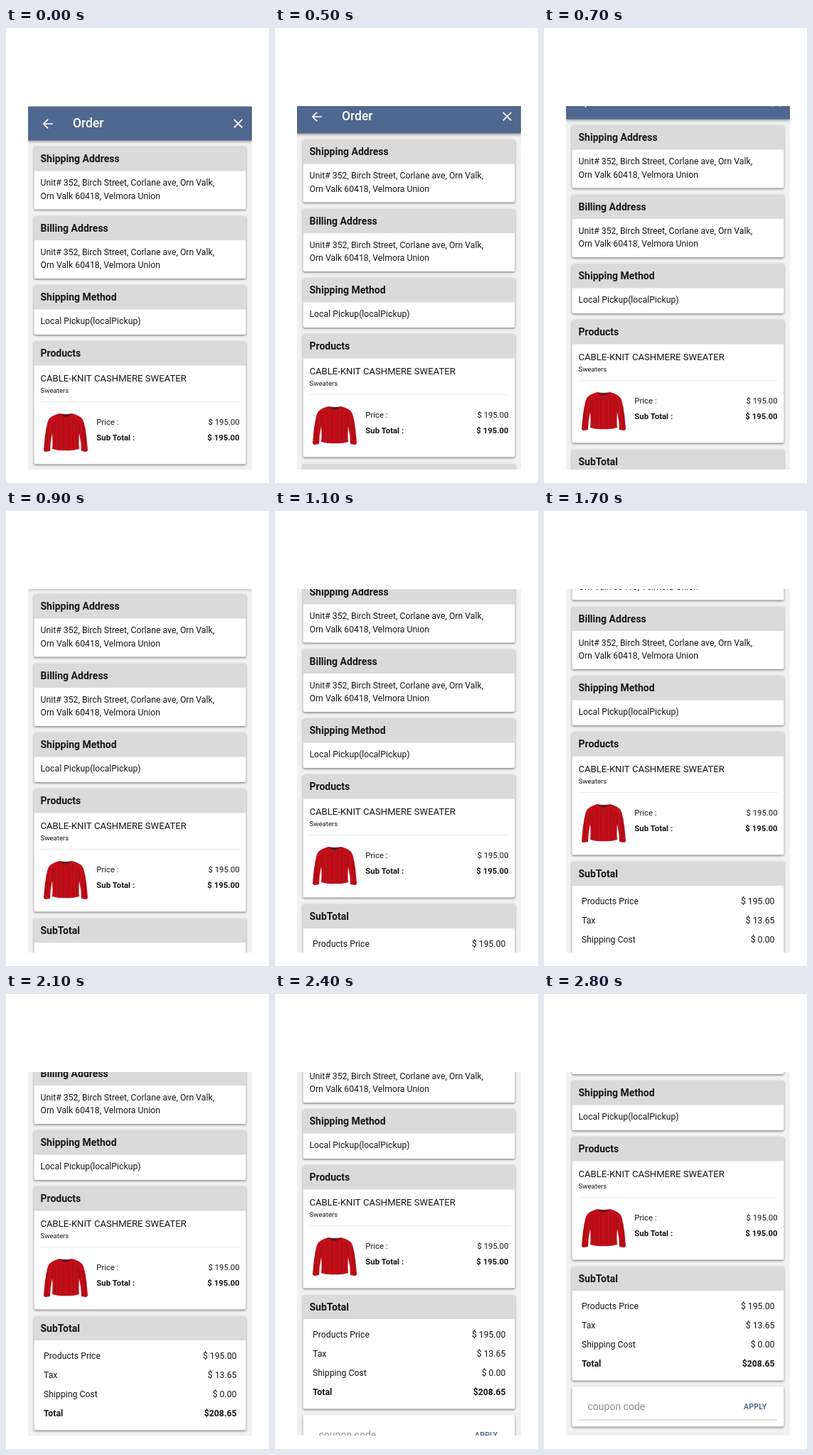
Write an HTML page with a canvas that moves like this. It is 370 px wide and 641 px high and loops after 2900 ms.

```html
<!DOCTYPE html>
<html lang="en">
<head>
<meta charset="utf-8">
<title>Order summary</title>
<style>
  html, body { margin: 0; width: 100%; height: 100%; overflow: hidden; background: #fff; }
  canvas { display: block; }
</style>
</head>
<body>
<canvas id="stage" width="370" height="641"></canvas>
<script>
const ctx = document.getElementById('stage').getContext('2d');
const LOOP = 2900, STEP = 100, HOLD_STEPS = 4, STEP_PX = 10;
const INK = '#161616', BLUE = '#50688f';
const ADDRESS = ['Unit# 352, Birch Street, Corlane ave, Orn Valk,', 'Orn Valk 60418, Velmora Union'];

function text(str, x, y, size, { weight = 400, color = INK, align = 'left', spacing = 0 } = {}) {
  ctx.font = `${weight} ${size}px Roboto, sans-serif`;
  ctx.letterSpacing = spacing + 'px';
  ctx.fillStyle = color;
  ctx.textAlign = align;
  ctx.fillText(str, x, y);
}

function rect(x, y, w, h, color) {
  ctx.fillStyle = color;
  ctx.fillRect(x, y, w, h);
}

function withShadow(alpha, blur, dy, draw) {
  ctx.save();
  ctx.shadowColor = `rgba(0,0,0,${alpha})`;
  ctx.shadowBlur = blur;
  ctx.shadowOffsetY = dy;
  draw();
  ctx.restore();
}

function stroke(d, color, width) {
  ctx.strokeStyle = color;
  ctx.lineWidth = width;
  ctx.stroke(new Path2D(d));
}

function card(top, height, title) {
  const box = new Path2D();
  box.roundRect(39.5, top, 298, height, 2);
  ctx.fillStyle = '#fff';
  withShadow(0.5, 3, 1.3, () => ctx.fill(box));
  if (!title) return;
  ctx.save();
  ctx.clip(box);
  rect(39, top, 299, 34.5, '#dadada');
  ctx.restore();
  text(title, 48.5, Math.round(top + 22), 14, { weight: 700 });
}

function row(label, value, left, right, y, size, weight) {
  text(label, left, y, size, { weight });
  text(value, right, y, size, { weight, align: 'right' });
}

function sweater() {
  ctx.save();
  ctx.translate(84, 543);
  for (const side of [-1, 1]) {
    ctx.save();
    ctx.scale(side, 1);
    ctx.fillStyle = '#c10f19';
    ctx.fill(new Path2D('M-.5 4 Q5 4 9 0 L15 2 Q24 5 26 14 Q30 32 31 51 Q31 54 28 54 L22 53 Q22 41 19 28 Q18 42 19 50 Q9 53 -.5 52 Z'));
    stroke('M19 29 Q20 18 17 11 M27 20 L28 48 M22 50 L31 51', '#8f0b13', 0.8);
    stroke('M4 7 V49 M10 6 V49 M15 12 V48 M24 17 Q26 34 26 50', 'rgba(130,5,14,.4)', 1);
    ctx.restore();
  }
  ctx.fillStyle = '#7d1018';
  ctx.fill(new Path2D('M-9 0 Q0 2 9 0 Q6 5 0 5 Q-6 5 -9 0Z'));
  rect(-2, 1.5, 4, 2, '#2c2a3c');
  ctx.restore();
}

function toolbar() {
  withShadow(0.4, 4, 1.8, () => rect(31, 110, 315, 48.5, BLUE));
  rect(31, 110, 315, 1, '#b5a3ad');
  stroke('M66 135 H53.5 M59.2 128.6 L52.8 135 L59.2 141.4', '#fff', 1.7);
  stroke('M320.8 128.8 L332.4 140.4 M332.4 128.8 L320.8 140.4', '#fff', 1.7);
  text('Order', 94, 140, 17.5, { weight: 500, color: '#fff' });
}

function page() {
  card(167, 88.5, 'Shipping Address');
  card(264.5, 88.5, 'Billing Address');
  [222, 320].forEach((y, i) => {
    text(ADDRESS[0], 48.5, y, 12.25);
    text(ADDRESS[1], 48.5, y + 19 - i, 12.25);
  });

  card(362, 70, 'Shipping Method');
  text('Local Pickup(localPickup)', 48.5, 417, 12.25);

  card(441, 173.5, 'Products');
  text('CABLE-KNIT CASHMERE SWEATER', 48.5, 498, 13.125);
  text('Sweaters', 48.5, 514, 9.625);
  rect(48, 526, 281, 1, '#ededed');
  sweater();
  row('Price :', '$ 195.00', 127.3, 328.6, 559, 11.375, 400);
  row('Sub Total :', '$ 195.00', 127.3, 328.6, 581, 11.375, 700);

  card(623.5, 161, 'SubTotal');
  row('Products Price', '$ 195.00', 53, 324.5, 684, 12.25, 400);
  row('Tax', '$ 13.65', 53, 324.5, 711, 12.25, 400);
  row('Shipping Cost', '$ 0.00', 53, 324.5, 738, 12.25, 400);
  row('Total', '$208.65', 53, 324.5, 765, 12.25, 700);

  card(793, 56.5);
  text('coupon code', 61.5, 826, 14, { color: '#8f8f8f' });
  text('APPLY', 281, 825, 10.5, { weight: 500, color: '#405a86', spacing: 0.25 });
  rect(48, 839, 280, 2, '#e2e2e2');

  toolbar();
}

function frame() {
  const step = Math.floor(performance.now() % LOOP / STEP);
  const scroll = Math.max(0, step - HOLD_STEPS) * STEP_PX;
  rect(0, 0, 370, 641, '#fff');
  ctx.save();
  ctx.beginPath();
  ctx.rect(31, 110, 315, 512);
  ctx.clip();
  rect(31, 110, 315, 512, '#f1f1f1');
  ctx.translate(0, -scroll);
  page();
  ctx.restore();
  requestAnimationFrame(frame);
}
frame();
</script>
</body>
</html>
```
